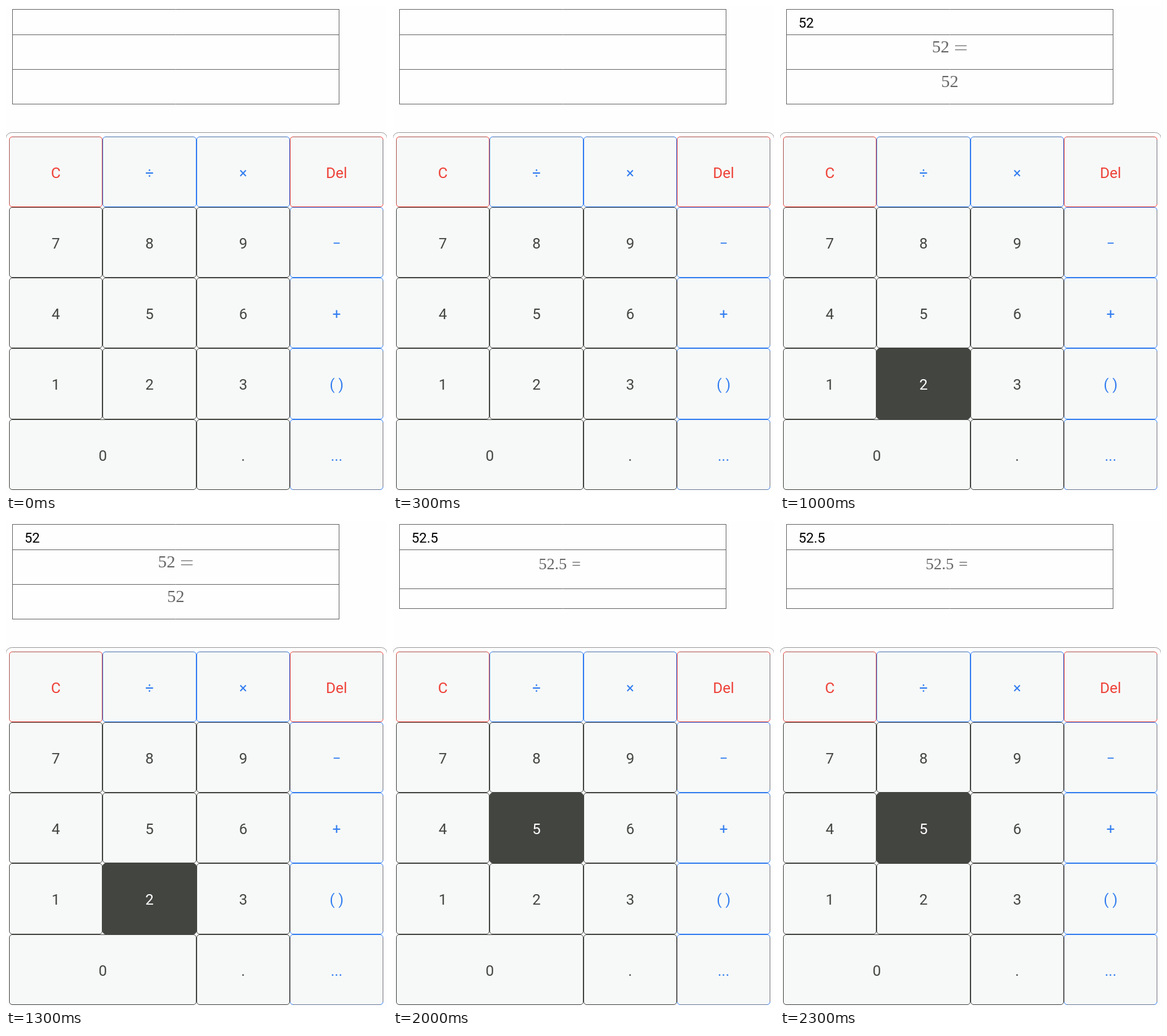
Write an HTML page with a canvas that moves like this. It is 616x787 px and loops after 2500 ms.

```html
<!DOCTYPE html>
<html lang="en">
<head>
<meta charset="utf-8">
<title>Calculator</title>
<style>
  html, body { margin: 0; width: 100%; height: 100%; overflow: hidden; background: #fefefe; }
  canvas { display: block; }
</style>
</head>
<body>
<canvas width="616" height="787"></canvas>
<script>
const ctx = document.querySelector('canvas').getContext('2d');
const STEP = 500;
const PRESSES = ['', '5', '2', '.', '5'];
const COLS = [5, 156, 308, 459, 610];
const ROWS = [211, 325, 439, 553, 668, 782];
const LAYOUT = [
  ['C', '÷', '×', 'Del'],
  ['7', '8', '9', '−'],
  ['4', '5', '6', '+'],
  ['1', '2', '3', '( )'],
  ['0', null, '.', '...'],
];
const DARK = '#434541', BLUE = '#327df0', RED = '#ee4037', GREY = '#666';

function text(str, x, y, font, color, align = 'left') {
  ctx.font = font;
  ctx.fillStyle = color;
  ctx.textAlign = align;
  ctx.fillText(str, x, y);
}

function line(x1, y1, x2, y2, color) {
  ctx.strokeStyle = color;
  ctx.beginPath();
  ctx.moveTo(x1, y1);
  ctx.lineTo(x2, y2);
  ctx.stroke();
}

function box(x, y, w, h, r, fill, stroke) {
  ctx.beginPath();
  ctx.roundRect(x + 0.5, y + 0.5, w - 1, h - 1, r);
  ctx.fillStyle = fill;
  ctx.fill();
  ctx.strokeStyle = stroke;
  ctx.stroke();
}

function drawKey(label, row, col, pressed) {
  const x = COLS[col], y = ROWS[row];
  const right = COLS[label === '0' ? 2 : col + 1], bottom = ROWS[row + 1];
  const color = /C|Del/.test(label) ? RED : /[\d.]/.test(label) && col < 3 ? DARK : BLUE;
  box(x, y, right - x, bottom - y, 4.5, pressed ? DARK : '#f7f9f8', color);

  // The outer rim of the pad is duller than the inner seams.
  if (row === 0) line(x + 5, y + 0.5, right - 5, y + 0.5, 'rgba(110,110,110,.5)');
  if (row === 0 && col === 0) line(x + 0.5, y + 5, x + 0.5, bottom - 5, 'rgba(110,110,110,.5)');
  if (col === 3) line(right - 0.5, y + 5, right - 0.5, bottom - 5, '#77777f');
  if (col === 3 && row) line(x + 0.5, y + 5, x + 0.5, bottom - 5, '#77777f');
  if (col === 3 && row === 4) line(x + 5, bottom - 0.5, right - 5, bottom - 0.5, '#6f7c98');

  text(label, (x + right) / 2, (y + bottom) / 2 + 9.5, '24px Roboto, sans-serif',
    pressed ? '#fff' : color, 'center');
}

// Typeset "value =" centred in the table.
function drawEquation(value, baseline) {
  const em = 28;
  const font = em + 'px "Liberation Serif", serif';
  const digits = value.replace('.', '').length * em / 2;
  const width = digits + (value.includes('.') ? 0.278 * em : 0) + 1.056 * em;
  const x = 274.5 - width / 2;
  text(value, x, baseline, font, GREY);
  const signX = x + width - 0.722 * em;
  for (const rise of [0.367, 0.133])
    ctx.fillRect(signX, baseline - rise * em - 0.6, 0.666 * em, 1.2);
}

function drawTable(value) {
  const finished = value === '52.5';
  const lines = finished ? [5, 46, 109, 141] : [5, 46, 102, 158];
  for (const y of lines) line(10, y + 0.5, 539, y + 0.5, GREY);
  for (const x of [10.5, 538.5]) line(x, 5, x, lines[3] + 1, GREY);
  if (!value) return;

  text(value, 30, 35, '22px Roboto, sans-serif', '#000');
  if (finished) {
    const font = '26px "Liberation Serif", serif';
    text(value, 235.5, 78, font, GREY);
    text('=', 289, 78, font, GREY);
  } else {
    drawEquation(value, 74.5);
    text(value.replace('.', ''), 274.5, 130.5, '28px "Liberation Serif", serif', GREY, 'center');
  }
}

function draw(now) {
  const step = Math.floor(now / STEP) % PRESSES.length;
  ctx.fillStyle = '#fefefe';
  ctx.fillRect(0, 0, 616, 787);
  drawTable(PRESSES.slice(0, step + 1).join(''));
  box(-1, 204, 618, 700, 10, '#fefefe', '#999');
  LAYOUT.forEach((keys, row) => keys.forEach((label, col) => {
    if (label) drawKey(label, row, col, label === PRESSES[step]);
  }));
}

function loop() {
  draw(performance.now());
  requestAnimationFrame(loop);
}
loop();
</script>
</body>
</html>
```
